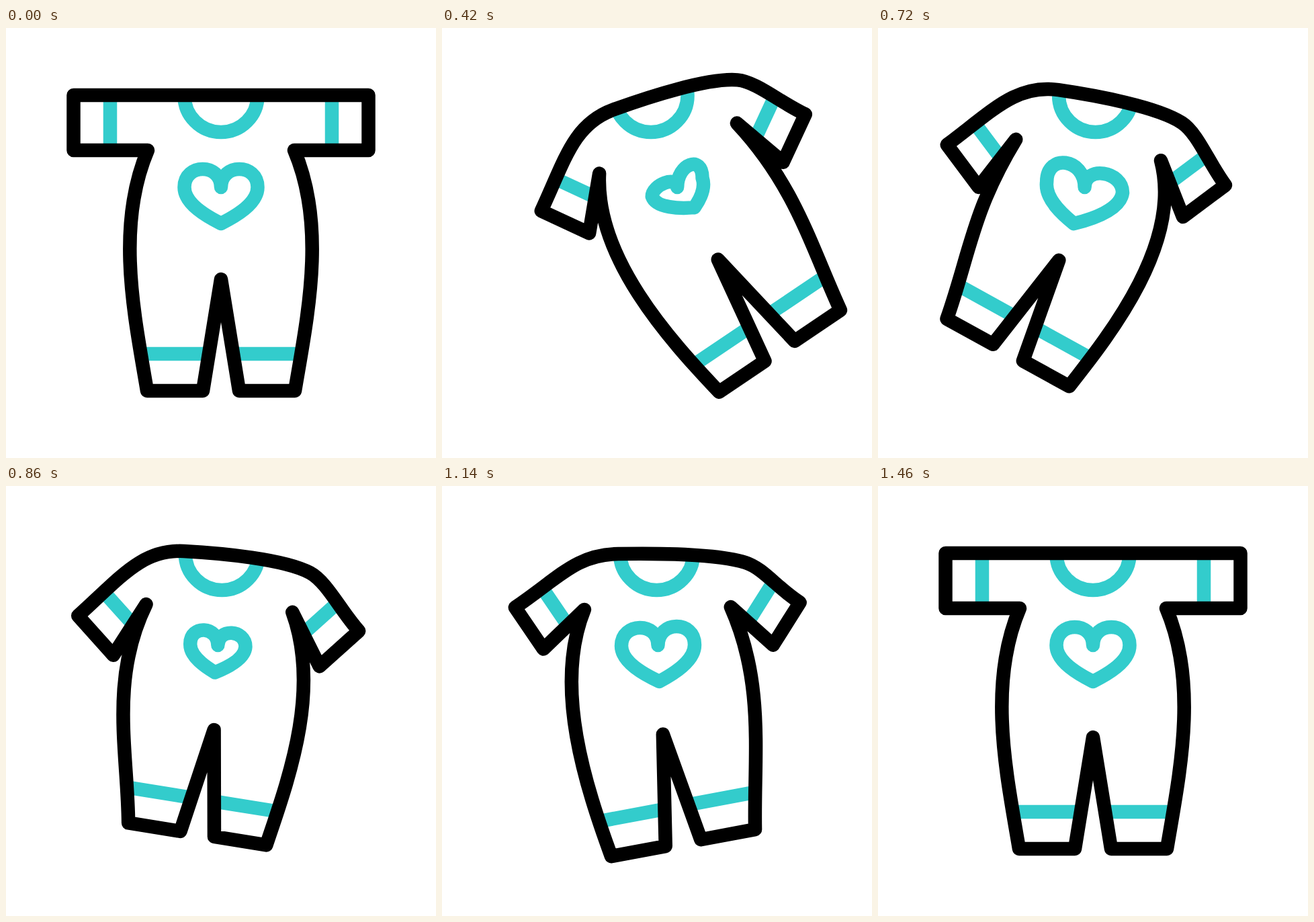
Animation, 640 px wide and 640 px high, one loop 2400 ms. Source, as an HTML page:

```html
<!DOCTYPE html>
<html lang="en">
<head>
<meta charset="utf-8">
<title>Baby romper</title>
<style>
  html, body { margin: 0; width: 100%; height: 100%; overflow: hidden; background: #fff; }
  svg { display: block; width: 100%; height: 100%; }
  path, circle { fill: none; stroke: #3cc; stroke-width: 20.5; stroke-linejoin: round; }
  #heart { stroke-linecap: round; }
  #body { stroke: #000; }
</style>
</head>
<body>
<svg viewBox="0 0 640 640">
  <clipPath id="inside"><path id="cut"/></clipPath>
  <path id="bands"/>
  <g clip-path="url(#inside)"><circle id="collar" cy="100.5" r="54.6"/></g>
  <path id="heart"/>
  <path id="body"/>
</svg>
<script>
const LOOP = 2400;
const rad = deg => deg * Math.PI / 180;

// Value at time t of a track of [time, value] stops, eased in and out.
function ease(t, ...stops) {
  const i = stops.findIndex(s => s[0] > t);
  if (i < 0) return stops[stops.length - 1][1];
  if (i === 0) return stops[0][1];
  const [[t0, a], [t1, b]] = [stops[i - 1], stops[i]], u = (t - t0) / (t1 - t0);
  return a + (b - a) * u * u * (3 - 2 * u);
}

// A damped swing with four turning points before coming to rest.
const swing = (t, a, b, c, d) =>
  ease(t, [0, 0], [420, a], [710, b], [1060, c], [1260, d], [1460, 0]);

// Local coordinates: moved to (ox, oy), turned and scaled.
function frame([ox, oy], deg, k = 1) {
  const c = k * Math.cos(rad(deg)), s = k * Math.sin(rad(deg));
  return (x, y) => [ox + x * c - y * s, oy + x * s + y * c];
}

// Tag for path data whose slots are points.
const path = (text, ...pts) => String.raw({ raw: text },
  ...pts.map(([x, y]) => x.toFixed(2) + "," + y.toFixed(2) + " "));

// Point where the ray from p along p-q crosses the line a-b.
function meet(p, q, a, b) {
  const dx = q[0] - p[0], dy = q[1] - p[1], ex = b[0] - a[0], ey = b[1] - a[1];
  const k = ((a[0] - p[0]) * ey - (a[1] - p[1]) * ex) / (dx * ey - dy * ex);
  return [p[0] + dx * k, p[1] + dy * k];
}

// The tip leans twice as far as the torso; the lobe on the raised side grows.
function heartHalf(side, tilt, size) {
  const p = (x, y) => {
    const lean = rad(y > 0 ? 2 * tilt * y / 54 : 0);
    const h = y < 0 ? y * (1 - side * tilt / 60) : y, w = side * x;
    return [
      320 - 1.5 * tilt + size * (w * Math.cos(rad(tilt)) - h * Math.sin(lean)),
      237 + size * (w * Math.sin(rad(tilt)) + h * Math.cos(lean))
    ];
  };
  return path`M${p(0, 0)}C${p(0, -36)}${p(54.5, -36)}${p(54.5, 0)}C${p(54.5, 25)}${p(20, 44)}${p(0, 54)}`;
}

const el = id => document.getElementById(id);

function draw(t) {
  const tilt = swing(t, -20.1, 8.3, -4.8, 5.8);
  const kick = swing(t, -34, 29, -21, 8);
  const droop = ease(t, [0, 0], [420, 1], [980, 1], [1460, 0]);
  const hip = ease(t, [420, 320], [600, 344], [740, 344], [1140, 299], [1460, 320]);
  const legSize = ease(t, [0, 1], [420, .99], [580, .945], [860, .945], [1140, .99], [1460, 1]);
  const beat = ease(t, [160, 1], [430, .73], [630, 1.2], [860, .755], [1120, 1]);

  const torso = frame([320, 134], tilt);
  const legs = frame([hip, 210], kick, legSize);
  const armSize = 1 - .04 * droop - .3 * droop * (1 - droop);
  const arm = side => frame(torso(side * 101, 7 + 11 * droop), tilt + side * 45 * droop, armSize);
  const left = arm(-1), right = arm(1);
  const shoulder = frame(torso(132, -34 + 22 * droop), tilt + 25 * droop);

  const outline =
    path`M${legs(0, 164)}L${legs(27, 330)}L${legs(110, 330)}` +
    path`C${legs(128, 222)}${torso(158, 163)}${torso(109, 48)}` +
    path`L${right(118.5, 41)}L${right(118.5, -41)}` +
    path`C${right(76, -41)}${shoulder(28, 0)}${shoulder(0, 0)}` +
    path`C${shoulder(-43, 0)}${torso(0, -34)}${torso(-57, -34)}` +
    path`C${torso(-120, -34)}${left(-30, -41)}${left(-118.5, -41)}` +
    path`L${left(-118.5, 41)}L${torso(-109, 48)}` +
    path`C${torso(-158, 163)}${legs(-128, 222)}${legs(-110, 330)}L${legs(-27, 330)}Z`;

  const bands = [[-1, left], [1, right]].map(([side, sleeve]) => {
    const top = sleeve(side * 64, -41), cuff = sleeve(side * 118.5, 41);
    const end = meet(top, sleeve(side * 64, 41), cuff, torso(side * 109, 48));
    return path`M${top}L${end}M${legs(side * 18, 275)}L${legs(side * 118, 275)}`;
  });

  el("body").setAttribute("d", outline);
  el("cut").setAttribute("d", outline);
  el("bands").setAttribute("d", bands.join(""));
  el("collar").setAttribute("cx", 320 + .45 * tilt);
  el("heart").setAttribute("d", heartHalf(-1, tilt, beat) + heartHalf(1, tilt, beat));
}

const begin = performance.now();
function tick() {
  draw((performance.now() - begin) % LOOP);
  requestAnimationFrame(tick);
}
tick();
</script>
</body>
</html>
```
